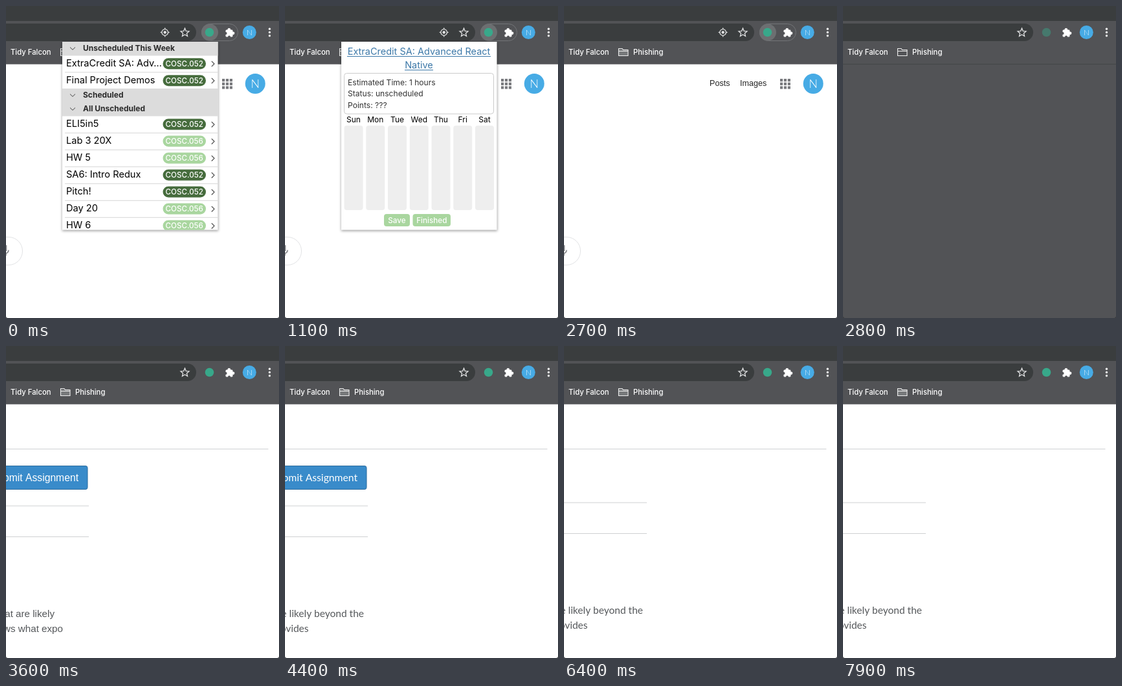
Animation, 422 px wide and 480 px high, one loop 8000 ms. Source, as an HTML page with a canvas:

```html
<!DOCTYPE html>
<html lang="en">
<head>
<meta charset="utf-8">
<title>Course planner</title>
<style>
html, body { margin: 0; width: 100%; height: 100%; overflow: hidden; background: #fff; }
canvas { display: block; width: 422px; height: 480px; }
</style>
</head>
<body>
<canvas id="stage"></canvas>
<script>
const W = 422, H = 480, LOOP = 8000;
const canvas = document.getElementById('stage');
const ctx = canvas.getContext('2d');
const dpr = window.devicePixelRatio || 1;
canvas.width = W * dpr;
canvas.height = H * dpr;

const UI = 'Inter, "Open Sans", sans-serif';
const ARIAL = '"Liberation Sans", Arial, sans-serif';
const LATO = 'Lato, sans-serif';
const BAR = '#525356', DARK = '#3a3d3e', BLUE = '#47abe5';
const GREEN = '#466c3d', PALE = '#a9d69f';

// Scene changes, in ms
const T = { detail: 900, block: 1400, close: 2500, leave: 2800, ready: 2900,
            page: 3500, webfont: 4100, submitted: 5400 };

function rect(x, y, w, h, color) {
  ctx.fillStyle = color;
  ctx.fillRect(x, y, w, h);
}

function round(x, y, w, h, r, fill, stroke, lw = 1) {
  ctx.beginPath();
  ctx.roundRect(x, y, w, h, r);
  if (fill) { ctx.fillStyle = fill; ctx.fill(); }
  if (stroke) { ctx.strokeStyle = stroke; ctx.lineWidth = lw; ctx.stroke(); }
}

function disc(x, y, r, color) {
  ctx.beginPath();
  ctx.arc(x, y, r, 0, Math.PI * 2);
  ctx.fillStyle = color;
  ctx.fill();
}

function path(points, color, lw = 1, closed = false) {
  ctx.beginPath();
  points.forEach(([x, y]) => ctx.lineTo(x, y));
  if (closed) ctx.closePath();
  ctx.strokeStyle = color;
  ctx.lineWidth = lw;
  ctx.stroke();
}

function text(s, x, y, size, color, { font = UI, weight = 400, align = 'left' } = {}) {
  ctx.font = `${weight} ${size}px ${font}`;
  ctx.textAlign = align;
  ctx.fillStyle = color;
  ctx.fillText(s, x, y);
}

function avatar(x, y, r, size) {
  disc(x, y, r, BLUE);
  text('N', x, y + size * 0.36, size, '#fff', { font: LATO, weight: 300, align: 'center' });
}

function star(cx, cy, r) {
  const pts = [];
  for (let i = 0; i < 10; i++) {
    const a = -Math.PI / 2 + i * Math.PI / 5, d = i % 2 ? r * 0.45 : r;
    pts.push([cx + d * Math.cos(a), cy + d * Math.sin(a)]);
  }
  path(pts, '#e2e3e4', 1.3, true);
}

function puzzle() {
  round(339.5, 36.5, 11, 11, 1.5, '#fff');
  disc(344.8, 36.4, 2.4, '#fff');
  disc(351, 41.8, 2.4, '#fff');
  disc(339.7, 42, 1.9, BAR);
  disc(345, 47.3, 1.9, BAR);
}

function locator() {
  const x = 245.7, y = 40.5, c = '#e2e3e4';
  ctx.beginPath();
  ctx.arc(x, y, 4.8, 0, Math.PI * 2);
  ctx.strokeStyle = c;
  ctx.lineWidth = 1.3;
  ctx.stroke();
  disc(x, y, 2.2, c);
  for (const [dx, dy] of [[1, 0], [-1, 0], [0, 1], [0, -1]])
    path([[x + dx * 4.8, y + dy * 4.8], [x + dx * 7, y + dy * 7]], c, 1.3);
}

function browser(t) {
  rect(0, 0, W, 23, DARK);
  rect(0, 23, W, 66.5, BAR);
  round(-30, 27, 324, 27, 13.5, DARK);
  const active = t < T.leave;
  if (active) {
    locator();
    round(302.5, 27.5, 56, 26, 13, null, '#737578');
    disc(315, 40.5, 13, '#6c6f71');
  }
  star(276.5, 41, 6.8);
  ctx.globalAlpha = t >= T.leave && t < T.ready ? 0.45 : 1;
  disc(314.5, 40.5, 6.8, '#38a88a');
  ctx.globalAlpha = 1;
  puzzle();
  avatar(376.3, 40.5, 10.5, 11.5);
  for (let i = -1; i < 2; i++) disc(407.5, 40.5 + i * 5.3, 1.7, '#f2f2f2');

  text('Tidy Falcon', 7, 75.2, 11.3, '#fff', { weight: 500 });
  ctx.beginPath();
  ctx.roundRect(84.5, 66.5, 14.5, 10, 1.5);
  ctx.fillStyle = active || t >= T.page ? '#77797b' : BAR;
  ctx.fill();
  path([[84.5, 76.5], [84.5, 65.5], [90, 65.5], [91.5, 67.5], [99, 67.5], [99, 76.5]], '#eee', 1.1, true);
  path([[84.5, 69.5], [99, 69.5]], '#eee');
  text('Phishing', 107, 75.2, 11.3, '#fff', { weight: 500 });
}

function searchPage() {
  rect(0, 89.5, W, H, '#fff');
  text('Posts', 225, 123.3, 12.6, '#262626', { font: ARIAL });
  text('Images', 272, 123.3, 12.6, '#262626', { font: ARIAL });
  for (let i = 0; i < 9; i++)
    rect(334 + i % 3 * 5.9, 112 + Math.floor(i / 3) * 5.7, 4.2, 4.2, '#77787c');
  avatar(385.3, 119.5, 15.5, 18);
  round(-60, 355.5, 85.5, 43, 21.5, '#fff', '#e2e3e5');
  ctx.beginPath();
  ctx.arc(-1, 375.5, 5, 0, Math.PI / 2);
  ctx.strokeStyle = '#85878a';
  ctx.lineWidth = 1.7;
  ctx.stroke();
  rect(0, 368, 1.3, 9, '#85878a');
  rect(0, 380, 0.8, 4, '#85878a');
}

function header(label, y) {
  rect(87, y, 241, 21.5, '#dcdcdc');
  path([[99, y + 8.5], [103, y + 12.3], [107, y + 8.5]], '#444');
  text(label, 119, y + 14.4, 12, '#2b2b2b', { weight: 700 });
}

function row(label, course, base) {
  text(label, 93, base, 14.6, '#000');
  round(242.5, base - 12.7, 66.5, 17, 8.5, course === '052' ? GREEN : PALE);
  text('COSC.' + course, 275.7, base, 11.6, '#fff', { weight: 500, align: 'center' });
  path([[317.8, base - 8.2], [322, base - 4], [317.8, base + 0.2]], '#444', 1.1);
  rect(91, base + 8.5, 237, 1, '#d6d6d6');
}

function listView() {
  header('Unscheduled This Week', 55);
  row('ExtraCredit SA: Adv…', '052', 93);
  row('Final Project Demos', '052', 119);
  header('Scheduled', 127);
  header('All Unscheduled', 148);
  const tasks = [['ELI5in5', '052'], ['Lab 3 20X', '056'], ['HW 5', '056'],
    ['SA6: Intro Redux', '052'], ['Pitch!', '052'], ['Day 20', '056'], ['HW 6', '056']];
  tasks.forEach(([name, course], i) => row(name, course, 186.3 + i * 26));
}

function detailView(t) {
  const link = '#3c78a8';
  text('ExtraCredit SA: Advanced React', 207, 75.3, 14.5, link, { align: 'center' });
  rect(96, 77, 222, 1, link);
  text('Native', 207, 96.3, 14.5, link, { align: 'center' });
  rect(185, 98, 44, 1, link);
  round(91.5, 103.5, 231, 62.5, 4, '#fff', '#cbcbcb');
  ['Estimated Time: 1 hours', 'Status: unscheduled', 'Points: ???'].forEach((s, i) =>
    text(s, 97, 122 + i * 17.3, 12.1, '#333'));
  ['Sun', 'Mon', 'Tue', 'Wed', 'Thu', 'Fri', 'Sat'].forEach((day, i) => {
    const x = 91.5 + i * 33.75;
    text(day, x + 14.5, 179.3, 12, '#000', { align: 'center' });
    round(x, 184, 29, 130, 4, '#eeeeee');
  });
  if (t >= T.block) round(159, 286.5, 29, 9.5, 4, '#c9c9c9');
  button('Save', 153, 40);
  button('Finished', 197.5, 58.5);
}

function button(label, x, w) {
  round(x, 320, w, 19, 4, PALE);
  text(label, x + w / 2, 333.7, 11.7, '#fff', { weight: 500, align: 'center' });
}

function popup(t) {
  ctx.save();
  ctx.shadowColor = 'rgba(0,0,0,.4)';
  ctx.shadowBlur = 4 * dpr;
  ctx.shadowOffsetY = dpr;
  rect(87, 55, 240.5, 289.5, '#fff');
  ctx.restore();
  ctx.save();
  ctx.beginPath();
  ctx.rect(87, 55, 240.5, 289.5);
  ctx.clip();
  if (t < T.detail) listView();
  else detailView(t);
  ctx.restore();
}

function coursePage(t) {
  const web = t >= T.webfont, sent = t >= T.submitted;
  const font = web ? LATO : ARIAL, up = sent ? -5 : 0;
  const right = { font, align: 'right' };
  rect(0, 89.5, W, H, '#fff');
  rect(0, 158, 405.5, 1, '#cfd1d3');
  if (!sent) {
    round(-20, 184.5, 146, 36, 3, '#398bca', '#2f6d9e');
    text('Submit Assignment', 112, 208.3, 15.7, '#fff', right);
  }
  rect(0, 245.5 + up, 128, 1, '#cfd1d3');
  rect(0, 293 + up, 128, 1, '#cfd1d3');
  const lines = web ? [['are likely beyond the', 122], ['provides', 36.5]]
                    : [['that are likely', 75], ['shows what expo', 88]];
  lines.forEach(([s, x], i) => text(s, x, 416.5 + i * 23 + up, web ? 15.5 : 15.2, '#55585b', right));
}

function corners() {
  for (const x of [0, W]) {
    const d = x ? -1 : 1;
    ctx.beginPath();
    ctx.moveTo(x, H);
    ctx.lineTo(x, H - 3);
    ctx.quadraticCurveTo(x, H, x + 3 * d, H);
    ctx.fillStyle = '#333';
    ctx.fill();
  }
}

function draw(t) {
  ctx.setTransform(dpr, 0, 0, dpr, 0, 0);
  const blank = t >= T.leave && t < T.page;
  if (t < T.leave) searchPage();
  else if (blank) rect(0, 89.5, W, H, BAR);
  else coursePage(t);
  browser(t);
  if (blank) rect(0, 89, W, 1, '#434547');
  if (t < T.close) popup(t);
  corners();
}

const start = performance.now();
function tick() {
  draw((performance.now() - start) % LOOP);
  requestAnimationFrame(tick);
}
tick();
</script>
</body>
</html>
```
